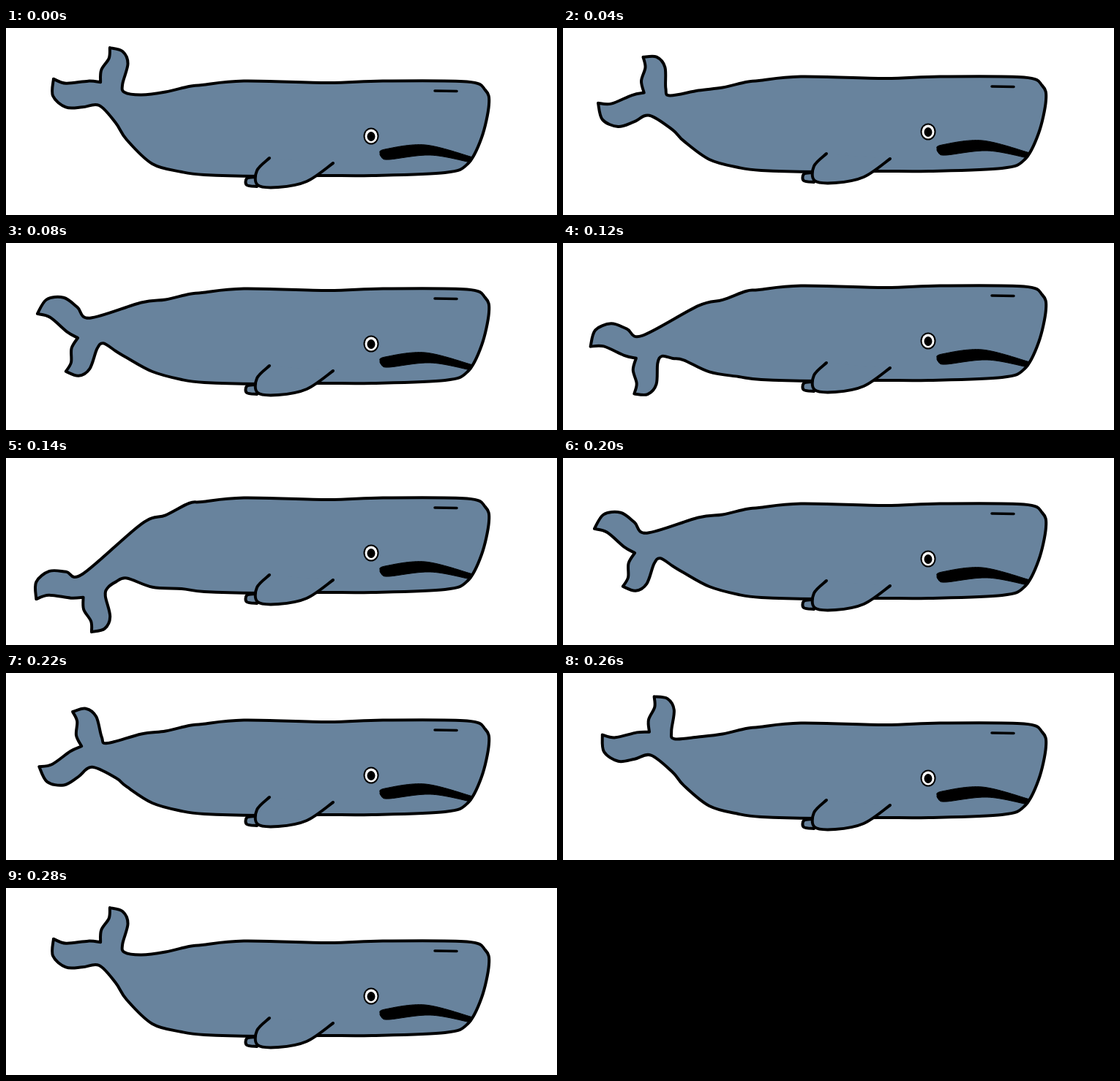
Recreate the animation shown at these times as an HTML page with a canvas. Size 753x256 px, loop 0.3 s.

```html
<!DOCTYPE html>
<html lang="en">
<head>
<meta charset="utf-8">
<title>Swimming whale</title>
<style>
  html, body { margin: 0; width: 100%; height: 100%; overflow: hidden; background: #fff; }
  canvas { display: block; }
</style>
</head>
<body>
<canvas id="stage" width="753" height="256"></canvas>
<script>
const ctx = document.getElementById('stage').getContext('2d');
const SKIN = '#68839d';
const STEP_MS = 20, STEPS = 15;

// Rigid front, from the belly around the head to the back.
const front = [
  [240, 197], [271, 201], [345, 203], [430, 202], [500, 202], [600, 198],
  [631, 186], [650, 150], [660, 105], [655, 85], [630, 73.5], [515, 72.5],
  [440, 75], [325, 72.5], [268, 78], [250, 80]
];

// Fluke edges; x runs from one tip to the other, y towards the body.
const fluke = {
  rightInner: [[88, 0], [80, 12], [63, 21], [54, 35]],
  leftInner: [[54, 35], [40, 25.5], [12, 13.5], [0, 0]],
  leftOuter: [[0, 0], [-12, 20], [-4, 42], [16, 53], [37, 62]],
  rightOuter: [[76, 63], [79, 52], [99, 31], [101, 13], [88, 0]]
};

const fin = [[360, 178], [343, 195], [344, 215], [372, 218], [411, 210], [447, 185]];
const farFin = [[340, 204], [329, 206], [329, 215], [343, 217]];
const mouthTop = [[514, 178], [511, 172], [518, 166], [573, 160], [638, 177]];
const mouthBottom = [[635, 184], [580, 174], [524, 180], [514, 178]];

// Adds a smooth curve through the points to the current path.
function curve(points) {
  ctx.lineTo(...points[0]);
  for (let i = 0; i < points.length - 1; i++) {
    const b = points[i], c = points[i + 1];
    const a = points[i - 1] || b, d = points[i + 2] || c;
    ctx.bezierCurveTo(
      b[0] + (c[0] - a[0]) / 6, b[1] + (c[1] - a[1]) / 6,
      c[0] - (d[0] - b[0]) / 6, c[1] - (d[1] - b[1]) / 6,
      c[0], c[1]
    );
  }
}

function shape(runs, fill, lineWidth) {
  ctx.beginPath();
  runs.forEach(curve);
  ctx.fillStyle = fill;
  ctx.fill();
  ctx.lineWidth = lineWidth;
  ctx.stroke();
}

function oval(x, y, rx, ry, fill) {
  ctx.beginPath();
  ctx.ellipse(x, y, rx, ry, 0, 0, Math.PI * 2);
  ctx.fillStyle = fill;
  ctx.fill();
}

// Maps fluke coordinates to the stage; the fluke mirrors on the downstroke.
function flukePlacer(swing, rising) {
  const degrees = rising ? 61 - 1.85 * swing ** 2 : 15 - 8.25 * swing;
  const sin = Math.sin(degrees * Math.PI / 180);
  const cos = Math.cos(degrees * Math.PI / 180);
  const pivotX = 122.5 + 4.15 * Math.max(0, 5.5 - swing);
  const pivotY = 97.2 + 2.5 * swing + 0.82 * swing ** 2;
  return ([x, y]) => {
    const u = (rising ? 1 : -1) * (x - 57), v = y - 63;
    return [pivotX + u * sin + v * cos, pivotY - u * cos + v * sin];
  };
}

function bodyRuns(swing) {
  const rising = swing < 5;
  const place = flukePlacer(swing, rising);
  const sag = Math.max(0, swing - 5);
  const trunk = [
    [150, 130 + 4.6 * swing + 0.2 * swing ** 2],
    [165, 153 + 2.2 * swing + 0.12 * swing ** 2],
    [200, 186 + 2.2 * sag],
    ...front,
    [218, 87.5 + 2.2 * sag],
    [185, 91.5 + 4.2 * sag]
  ];
  if (!rising) trunk.reverse();
  return [
    fluke.rightInner.map(place),
    fluke.leftInner.map(place),
    [...fluke.leftOuter.map(place), ...trunk, ...fluke.rightOuter.map(place)]
  ];
}

function drawWhale(swing) {
  ctx.save();
  ctx.translate(0, -2 * swing);
  ctx.lineCap = ctx.lineJoin = 'round';
  ctx.strokeStyle = '#000';

  shape([farFin], SKIN, 4);
  shape(bodyRuns(swing), SKIN, 4);
  shape([fin], SKIN, 4);
  shape([mouthTop, mouthBottom], '#000', 1);

  oval(499, 148, 10.5, 11.5, '#000');
  oval(499, 148, 8.5, 9.5, '#fff');
  oval(499, 148.5, 5.5, 6.5, '#000');

  ctx.beginPath();
  ctx.moveTo(586, 86);
  ctx.lineTo(616, 86.5);
  ctx.lineWidth = 3.5;
  ctx.stroke();
  ctx.restore();
}

// Back and forth, with double-size steps at both ends.
function swingAt(ms) {
  const step = Math.floor(ms / STEP_MS) % STEPS;
  const pose = Math.min(step, STEPS - 1 - step);
  return pose + (pose > 0) + (pose > 6);
}

function frame() {
  ctx.fillStyle = '#fff';
  ctx.fillRect(0, 0, 753, 256);
  drawWhale(swingAt(performance.now()));
  requestAnimationFrame(frame);
}
frame();
</script>
</body>
</html>
```
